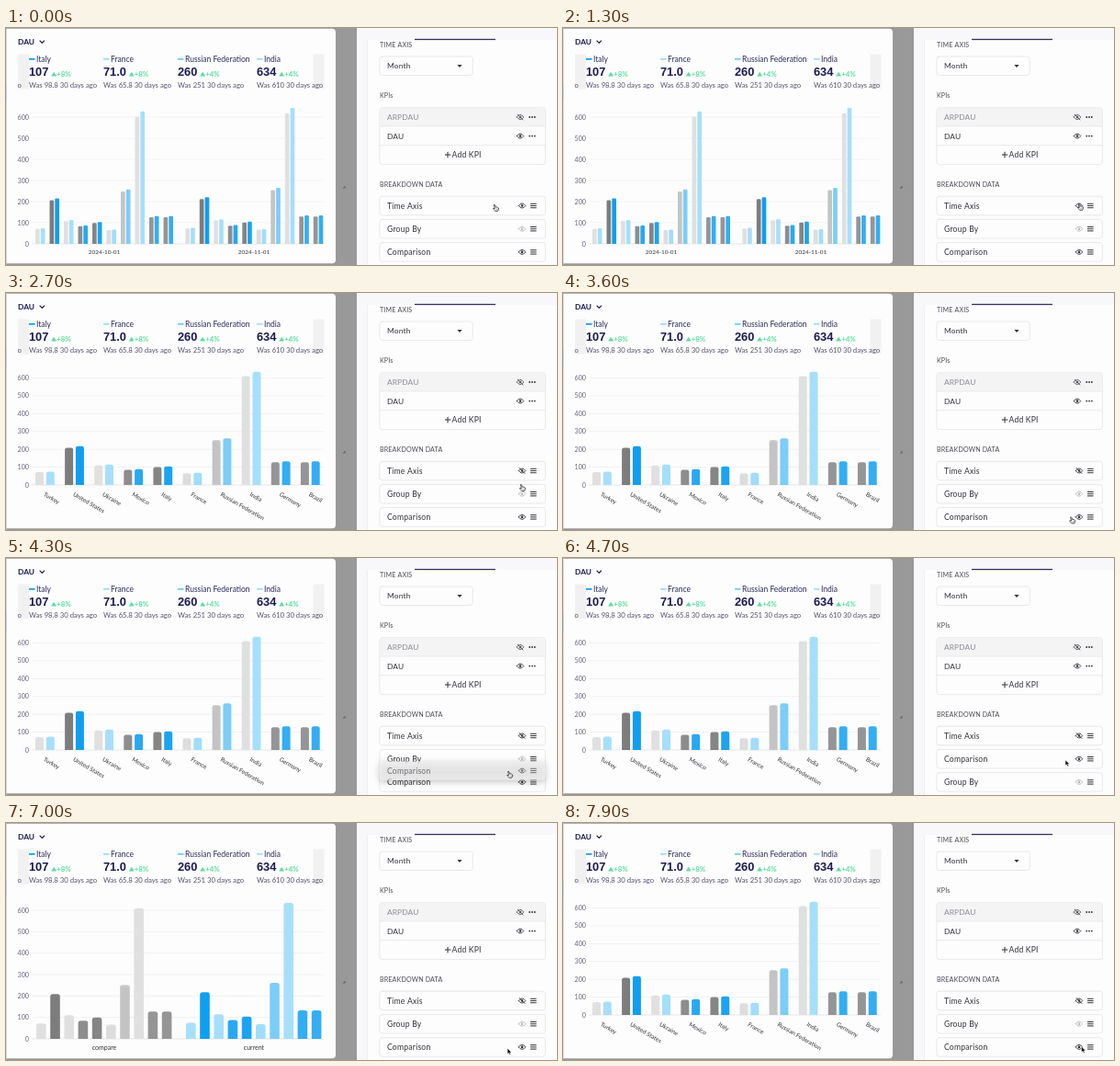
These frames come from a looping animation (600 px wide and 258 px high, 8000 ms). An HTML page with a canvas:

```html
<!DOCTYPE html>
<html lang="en">
<head>
<meta charset="utf-8">
<title>KPI breakdown</title>
<style>
html, body { margin: 0; width: 100%; height: 100%; overflow: hidden; background: #999; }
canvas { display: block; width: 600px; height: 258px; }
</style>
</head>
<body>
<canvas id="stage"></canvas>
<script>
const W = 600, H = 258, LOOP = 8000, STEP = 100;
const canvas = document.getElementById('stage');
const ctx = canvas.getContext('2d');
const dpr = window.devicePixelRatio || 1;
canvas.width = W * dpr;
canvas.height = H * dpr;

const NAVY = '#1d1a52', INK = '#33333b', MUTED = '#55536f', LABEL = '#4b4b55';
const LINE = '#e4e4e8', PAPER = '#fdfdfd', GREEN = '#5fdda0';
const GROWTH = 1.04;

// Name, earlier value, tint from strong (0) to pale (1)
const countries = [
  ['Turkey', 72, 1], ['United States', 209, 0], ['Ukraine', 110, 1],
  ['Mexico', 85, 0.16], ['Italy', 100, 0.08], ['France', 66, 0.97],
  ['Russian Federation', 251, 0.72], ['India', 610, 1],
  ['Germany', 128, 0.24], ['Brazil', 128, 0.24]
].map(([name, value, tint]) => ({ name, value, tint }));
const find = name => countries.find(c => c.name === name);

const mix = (a, b, k) => a + (b - a) * k;
const rgb = (a, b, k) => `rgb(${a.map((v, i) => mix(v, b[i], k))})`;
const gray = c => rgb([125, 125, 125], [224, 224, 224], c.tint);
const blue = c => rgb([15, 159, 240], [166, 223, 251], c.tint);

// Pointer moves: start, end, x, y
const moves = [
  [0, 900, 562, 191.5], [2400, 3300, 559, 243], [3300, 3900, 547.5, 245],
  [4000, 4600, 547, 220], [6000, 6800, 546, 245.5], [7300, 7900, 564.5, 243.5]
];

function pointerAt(t) {
  let x = 532, y = 192.5;
  for (const [from, to, toX, toY] of moves) {
    const k = Math.min(1, Math.max(0, (t - from) / (to - from)));
    x = mix(x, toX, k);
    y = mix(y, toY, k);
  }
  return [x, y];
}

// y is the middle of the capitals
function text(s, x, y, size, color, o = {}) {
  ctx.font = `${o.weight || 400} ${size}px ${o.font || 'Lato'}, sans-serif`;
  ctx.letterSpacing = (o.space || 0) + 'px';
  ctx.textAlign = o.align || 'left';
  ctx.fillStyle = color;
  ctx.fillText(s, x, y + size * 0.36);
  return ctx.measureText(s).width;
}

function rect(x, y, w, h, color) {
  ctx.fillStyle = color;
  ctx.fillRect(x, y, w, h);
}

function paint(fill, stroke, width = 0.8) {
  if (fill) { ctx.fillStyle = fill; ctx.fill(); }
  if (stroke) { ctx.strokeStyle = stroke; ctx.lineWidth = width; ctx.stroke(); }
}

function box(x, y, w, h, r, fill, stroke) {
  ctx.beginPath();
  ctx.roundRect(x, y, w, h, r);
  paint(fill, stroke);
}

function disc(x, y, r, color) {
  ctx.beginPath();
  ctx.arc(x, y, r, 0, 7);
  paint(color);
}

function poly(points, fill, stroke, width) {
  ctx.beginPath();
  points.forEach(p => ctx.lineTo(...p));
  ctx.closePath();
  ctx.lineJoin = 'round';
  paint(fill, stroke, width);
}

function line(points, color, width = 1) {
  ctx.beginPath();
  points.forEach(p => ctx.lineTo(...p));
  ctx.lineJoin = ctx.lineCap = 'round';
  paint(null, color, width);
}

function eye(x, y, color, off) {
  ctx.beginPath();
  ctx.moveTo(x - 3.8, y);
  ctx.quadraticCurveTo(x, y - 5.2, x + 3.8, y);
  ctx.quadraticCurveTo(x, y + 5.2, x - 3.8, y);
  paint(null, color, 0.9);
  disc(x, y, 1.3, color);
  if (off) line([[x - 3, y - 3], [x + 3, y + 3]], color, 0.9);
}

function dots(x, y) {
  for (let i = -1; i < 2; i++) disc(x + i * 2.8, y, 0.95, INK);
}

function bar(x, w, base, h, color) {
  box(x, base - h, w, h, [w / 4, w / 4, 0, 0], color);
}

function axis(base, scale) {
  for (let v = 0; v <= 600; v += 100) {
    const y = base - v * scale;
    rect(28, y - 0.4, 318, 0.8, v ? '#efeff1' : '#e2e2e6');
    text(v, 25, y, 7.2, '#66667c', { align: 'right' });
  }
}

// Two bars per country, earlier and current
function pairs(x0, pitch, w, shift, base, scale) {
  countries.forEach((c, i) => {
    const x = x0 + i * pitch, h = c.value * scale;
    bar(x, w, base, h, gray(c));
    bar(x + shift, w, base, h * GROWTH, blue(c));
  });
}

function monthChart() {
  const scale = 0.23;
  axis(235, scale);
  [0, 1].forEach(m => {
    pairs(32 + m * 163.3, 15.5, 4.7, 5.8, 235, scale * (0.988 + m * 0.026));
    text(`2024-1${m}-01`, 107 + m * 163, 244, 6.4, INK, { align: 'center' });
  });
}

function countryChart() {
  const scale = 0.1942;
  axis(209, scale);
  pairs(32, 32.1, 9, 11.8, 209, scale);
  countries.forEach((c, i) => {
    ctx.save();
    ctx.translate(41.5 + i * 32.1, 218.5);
    ctx.rotate(Math.PI / 6);
    text(c.name, 0, 0, 6.5, INK);
    ctx.restore();
  });
}

function compareChart() {
  const scale = 0.2333;
  axis(235, scale);
  countries.forEach((c, i) => {
    const x = 33 + i * 15.2, h = c.value * scale;
    bar(x, 10.6, 235, h, gray(c));
    bar(x + 163, 10.6, 235, h * GROWTH, blue(c));
  });
  ['compare', 'current'].forEach((s, i) =>
    text(s, 107 + i * 163, 244, 7, INK, { align: 'center' }));
}

function stat(x, name, value, growth, was) {
  rect(x, 32.8, 6.5, 2, blue(find(name)));
  text(name, x + 8, 33.5, 8.5, '#2d2a5c');
  const bold = { weight: 700, font: 'Liberation Sans' };
  const g = x + text(value, x, 47.5, 12.8, NAVY, bold) + 2.8;
  poly([[g, 52.6], [g + 3, 47.8], [g + 6, 52.6]], GREEN);
  text(growth, g + 6, 50.3, 7.9, GREEN, { weight: 700 });
  text(`Was ${was} 30 days ago`, x, 62.5, 7.7, MUTED);
}

function card(t) {
  box(-4, 0.7, 363, 255.5, 4, PAPER);
  rect(0, 0, 0.6, H, '#c4c4c4');
  rect(0, 61, 0.6, 20, '#a9d6ea');
  text('DAU', 13, 15, 8.4, NAVY, { weight: 700 });
  line([[37, 14], [39.3, 16.3], [41.6, 14]], NAVY, 1.1);
  for (const x of [13, 334.5]) rect(x, 28.5, 12, 38, '#f1f1f2');
  text('o', 12.6, 62.5, 7.7, MUTED);
  stat(25, 'Italy', '107', '+8%', '98.8');
  stat(106, 'France', '71.0', '+8%', '65.8');
  stat(187, 'Russian Federation', '260', '+4%', '251');
  stat(273, 'India', '634', '+4%', '610');
  if (t < 1400) monthChart();
  else if (t >= 4800 && t < 7100) compareChart();
  else countryChart();
}

function rowContent(name, y, hidden) {
  text(name, 415, y, 8.6, INK, { space: 0.22 });
  eye(562, y, name === 'Group By' ? '#b9b9bd' : INK, hidden);
  for (let i = -1; i < 2; i++) rect(571, y - 0.5 + i * 2.2, 6.6, 1, INK);
}

function row(name, y, hidden) {
  box(406.8, y - 10.3, 180.6, 20.6, 3, PAPER, LINE);
  rowContent(name, y, hidden);
}

function ghost(y) {
  ctx.save();
  ctx.shadowColor = 'rgba(0,0,0,.3)';
  ctx.shadowBlur = 7 * dpr;
  ctx.shadowOffsetY = 2 * dpr;
  box(406.8, y - 10.3, 180.6, 20.6, 3, 'rgba(240,240,240,.75)');
  ctx.shadowColor = 'transparent';
  ctx.globalAlpha = 0.65;
  rowContent('Comparison', y);
  ctx.restore();
}

function kpi(name, y, color, hidden) {
  text(name, 415, y, 8.4, color, { space: 0.1 });
  eye(560, y, hidden ? '#55555c' : INK, hidden);
  dots(573, y);
}

function panel(t) {
  const label = (s, y) => text(s, 407, y, 7.1, LABEL, { space: 0.15 });
  rect(382, 0, 218, H, '#f8f8fa');
  rect(393, 13, 207, H, PAPER);
  rect(393, 13, 0.8, H, '#ececf0');
  rect(445, 11.8, 88, 1.3, '#37335c');

  label('TIME AXIS', 18.3);
  box(406.8, 31, 101.5, 20.5, 3, PAPER, LINE);
  text('Month', 415, 41.3, 8.3, INK, { space: 0.2 });
  poly([[491.4, 40], [496.6, 40], [494, 43]], INK);

  label('KPIs', 73);
  box(406.8, 86.8, 180.6, 61.8, 3, PAPER, LINE);
  box(407.2, 87.2, 179.8, 19.6, [3, 3, 0, 0], '#f4f4f5');
  for (const y of [106.6, 127.4]) rect(407, y, 180, 0.8, LINE);
  kpi('ARPDAU', 97, '#8d8d94', true);
  kpi('DAU', 117.6, INK);
  line([[478, 138], [484, 138]], INK);
  line([[481, 135], [481, 141]], INK);
  text('Add KPI', 485.5, 138.2, 8.6, INK, { space: 0.2 });

  label('BREAKDOWN DATA', 170);
  const rows = ['Time Axis', 'Group By', 'Comparison'];
  if (t >= 4700 && t < 6900) rows.push(rows.splice(1, 1)[0]);
  rows.forEach((name, i) => row(name, 193.5 + i * 25.2, !i && t >= 1400));
}

function arrow() {
  poly([[0, 0], [0, 6], [1.5, 4.8], [2.6, 7], [3.7, 6.5], [2.7, 4.4], [4.5, 4.2]],
    '#111', '#fff', 0.5);
}

function hand() {
  ctx.scale(0.92, 0.92);
  poly([[-1, 0.3], [0, -0.3], [0.8, 0.6], [1.3, 2.6], [3.6, 2.9], [4.8, 3.8],
    [4.7, 5.8], [3.8, 7.4], [1, 7.4], [-1.6, 4.9], [-1.5, 4], [0, 4.3]],
    '#fff', INK, 0.9);
  for (const x of [2, 3.3]) line([[x, 4.7], [x, 6]], '#555', 0.5);
}

function draw(t) {
  ctx.setTransform(dpr, 0, 0, dpr, 0, 0);
  rect(0, 0, W, H, '#999');
  card(t);
  poly([[366.3, 174.6], [369.6, 171.4], [369.6, 174.6]], '#666');
  panel(t);
  const [x, y] = pointerAt(t);
  const dragging = (t >= 4100 && t < 4700) || (t >= 6100 && t < 6900);
  if (dragging) ghost(y - 1);
  ctx.translate(x, y);
  if (t < 4700 || dragging) hand();
  else arrow();
}

const start = performance.now();
function tick() {
  const t = (performance.now() - start) % LOOP;
  draw(Math.floor(t / STEP) * STEP);
  requestAnimationFrame(tick);
}
tick();
</script>
</body>
</html>
```
